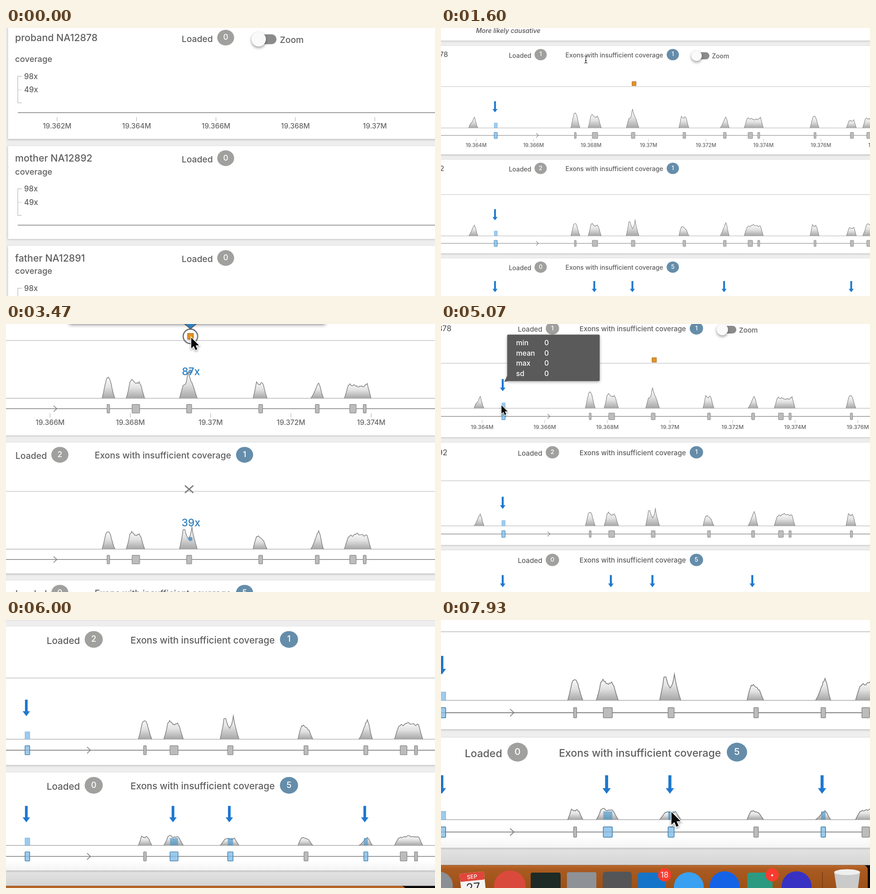
An HTML page with a canvas that plays this animation: 947x592 px, repeating every 8000 ms.

```html
<!DOCTYPE html>
<html lang="en">
<head>
<meta charset="utf-8">
<title>Gene coverage</title>
<style>
html, body { margin: 0; width: 100%; height: 100%; overflow: hidden; background: #eee; }
canvas { display: block; }
</style>
</head>
<body>
<canvas id="stage" width="947" height="592"></canvas>
<script>
const ctx = document.getElementById('stage').getContext('2d');
const LOOP = 8000, TRACK = 58.5, LEFT = -111, RIGHT = 1300;
const CLOSE = { s: 1.663, x: -197.5, y: -586 };
const FONT = 'Inter, "Open Sans", sans-serif';

const lerp = (a, b, p) => a + (b - a) * p;
const ramp = (t, a, b) => Math.min(1, Math.max(0, (t - a) / (b - a)));
const smooth = p => p * p * (3 - 2 * p);
const sine = p => (1 - Math.cos(Math.PI * p)) / 2;
const noise = n => { const v = Math.sin(n * 12.9898) * 43758.5453; return v - Math.floor(v) - 0.5; };

// Relative heights, evenly spaced across a peak
const shape = {
  skew: [0, .3, .45, .55, .8, 1, .6, .25, 0],
  bell: [0, .3, .66, .94, 1, .98, .82, .5, .22, 0],
  twin: [0, .35, .86, 1, .9, .8, .82, .87, .68, .32, 0],
  spire: [0, .25, .5, .53, .68, 1, .76, .6, .42, .2, 0],
  notch: [0, .38, .86, .87, .6, .46, .6, .98, .56, .26, 0],
  crown: [0, .45, 1, .85, .82, .95, .78, .35, 0],
  fall: [0, .55, .95, 1, .85, .78, .65, .3, 0],
  rise: [0, .15, .35, .6, .85, 1, .75, .3, 0],
  wide: [0, .4, .85, .97, .85, .92, .82, .76, .82, .85, .8, .92, 1, .5, 0],
  hump: [0, .4, .75, .85, .82, .9, .93, 1, .9, .92, .85, .87, .85, .4, 0],
  flat: [0, .4, .85, .95, .88, .85, 1, .5, 0]
};

// left, right, then [height, shape] for each sample
const peaks = [
  [62, 82, [24, 'skew'], [24, 'rise'], [13, 'flat']],
  [287, 307, [32, 'bell'], [27.5, 'bell'], [14, 'crown']],
  [325, 354, [30, 'twin'], [28, 'twin'], [15, 'twin']],
  [409, 437, [41, 'spire'], [35.5, 'notch'], [11, 'flat']],
  [525, 547, [26, 'crown'], [21, 'fall'], [12, 'fall']],
  [616, 636, [24, 'rise'], [29, 'rise'], [12, 'rise']],
  [669, 711, [23.5, 'wide'], [25, 'hump'], [14.5, 'hump']],
  [814, 834, [26, 'bell'], [25, 'crown'], [14, 'crown']],
  [894, 916, [18, 'flat'], [19, 'flat'], [12, 'flat']],
  [930, 970, [23, 'wide'], [27, 'twin'], [14, 'hump']]
];

// centre, width
const exons = [[121.5, 7], [296.8, 4], [340.2, 12], [424.2, 8], [537, 6], [626.2, 6],
  [682.5, 10], [701, 4.6], [825, 4.6], [906.3, 7], [943, 8]];

const rows = [
  { name: 'proband NA12878', loaded: 1, low: [0], lowCount: 1, top: 40, gene: 179, end: 221, before: 0, own: 1 },
  { name: 'mother NA12892', loaded: 2, low: [0], lowCount: 1, top: 232.3, gene: 358.5, end: 380.5, before: 1, own: 1 },
  { name: 'father NA12891', loaded: 0, low: [0, 2, 3, 5, 9], lowCount: 5, top: 391.5, gene: 517, end: 538, before: 2, own: 0 }
];

function text(str, x, y, size, color = '#5e5e5e', align = 'left', style = '500') {
  ctx.font = `${style} ${size}px ${FONT}`;
  ctx.textAlign = align;
  ctx.textBaseline = 'alphabetic';
  ctx.fillStyle = color;
  ctx.fillText(str, x, y + size * 0.355);
}

function line(color, width, ...p) {
  ctx.strokeStyle = color;
  ctx.lineWidth = width;
  ctx.beginPath();
  for (let i = 0; i < p.length; i += 2) ctx.lineTo(p[i], p[i + 1]);
  ctx.stroke();
}

function poly(color, ...p) {
  ctx.fillStyle = color;
  ctx.beginPath();
  for (let i = 0; i < p.length; i += 2) ctx.lineTo(p[i], p[i + 1]);
  ctx.closePath();
  ctx.fill();
}

function rect(color, x, y, w, h, r = 0) {
  ctx.fillStyle = color;
  ctx.beginPath();
  ctx.roundRect(x, y, w, h, r);
  ctx.fill();
}

function disc(color, x, y, rx, ry = rx) {
  ctx.fillStyle = color;
  ctx.beginPath();
  ctx.ellipse(x, y, rx, ry, 0, 0, 7);
  ctx.fill();
}

function shadow(color, blur, dy) {
  ctx.shadowColor = color;
  ctx.shadowBlur = blur;
  ctx.shadowOffsetY = dy;
}

function faded(alpha, draw) {
  if (alpha <= 0) return;
  ctx.save();
  ctx.globalAlpha = alpha;
  draw();
  ctx.restore();
}

function card(top, bottom) {
  ctx.save();
  shadow('rgba(0,0,0,.22)', 4, 1.5);
  rect('#fff', -126.5, top, RIGHT + 200, bottom - top);
  ctx.restore();
}

function badge(x, y, n, color) {
  disc(color, x, y, 13.5, 12.5);
  text(n, x, y - 0.8, 12.4, '#fff', 'center');
}

function toggle(x, y) {
  rect('#8b8b8b', x - 8, y - 7.8, 36.3, 15.6, 7.8);
  ctx.save();
  shadow('rgba(0,0,0,.4)', 6, 3);
  disc('#fafafa', x, y, 11.5);
  ctx.restore();
  text('Zoom', x + 33.7, y + 0.8, 13.9);
}

function peak(x0, x1, height, pts, base, seed) {
  const n = (pts.length - 1) * 2;
  const g = ctx.createLinearGradient(0, base - height, 0, base);
  g.addColorStop(0, '#fafafa');
  g.addColorStop(0.45, '#e2e2e2');
  g.addColorStop(1, '#a6a6a6');
  ctx.beginPath();
  for (let i = 0; i <= n; i++) {
    const a = pts[i >> 1], b = pts[(i + 1) >> 1];
    let h = (a + b) / 2;
    if (i % 2 && h > 0.6) h += noise(seed + i) * 0.12;
    ctx.lineTo(lerp(x0, x1, i / n), base - h * height);
  }
  ctx.fillStyle = g;
  ctx.fill();
  ctx.strokeStyle = '#848484';
  ctx.lineWidth = 1.05;
  ctx.stroke();
}

function downArrow(x, y) {
  rect('#1d78cf', x - 2, y, 4, 19);
  poly('#1d78cf', x - 5.5, y + 17.2, x + 5.5, y + 17.2, x, y + 24.6);
}

function coverage(row, index, base) {
  line('#a9a9a9', 0.9, LEFT, base, RIGHT, base);
  peaks.forEach((p, i) => {
    const [h, kind] = p[2 + index];
    peak(p[0], p[1], h, shape[kind], base, index * 40 + i * 7);
  });
  for (const i of row.low) {
    const [x, w] = exons[i];
    rect(i ? 'rgba(66,145,200,.62)' : '#9ccbee', x - w / 2, base - 11, w, 11);
    if (!i) { ctx.strokeStyle = '#7fb4df'; ctx.lineWidth = 0.7; ctx.strokeRect(x - w / 2, base - 11, w, 11); }
    downArrow(x - 1.6, base - 59);
  }
}

function genes(row, y) {
  exons.forEach(([x, w], i) => {
    const low = row.low.includes(i);
    rect(low ? '#9ccaec' : '#bcbcbc', x - w / 2, y - 6.8, w, 13.6, 0.8);
    ctx.strokeStyle = low ? '#3c7aa8' : '#888';
    ctx.lineWidth = 0.9;
    ctx.stroke();
    if (low) line('rgba(60,122,168,.45)', 0.8, x - w / 2, y, x + w / 2, y);
  });
  line('#777', 1, 210.5, y - 4.8, 215.5, y, 210.5, y + 4.8);
}

function drawRow(row, index, open) {
  const shift = TRACK * open;
  const top = row.top + row.before * shift;
  const low = shift * (row.before + row.own);
  const y = row.gene + low, base = y - 16.4, head = top + 20;
  card(top, row.end + low);

  text(row.name, -115.3, head - 0.5, 15.4);
  text('Loaded', 150.3, head + 1.2, 13.9);
  badge(220.4, head - 0.6, open > 0.3 ? row.loaded : 0, '#a0a09e');
  if (!index) toggle(open > 0 ? 564 : 273, head + 2);

  text('coverage', -115.3, base - 69.2, 13.3);
  line('#b8b8b8', 0.9, LEFT + 6.5, base - 41.5, LEFT, base - 41.5, LEFT, base + 0.8, LEFT + 6.5, base + 0.8);
  line('#d4d4d4', 0.9, LEFT, base - 20, LEFT + 6.5, base - 20);
  text('98x', -100.8, base - 41.5, 12);
  text('49x', -100.8, base - 20, 12);

  line('#7d7d7d', 1.1, LEFT, y, RIGHT, y);
  if (!index) {
    for (let i = 0; i < 10; i++) {
      const x = -48.3 + i * 126.6;
      line('#b8b8b8', 0.9, x, y + 7.3, x, y + 13.8);
      text((19362 + 2 * i) / 1000 + 'M', x, y + 21.5, 11.2, '#666', 'center');
    }
  }

  faded(open, () => {
    text('Exons with insufficient coverage', 275.2, head + 0.3, 13.9);
    badge(511.6, head - 0.6, row.lowCount, '#658daa');
    if (row.own) line('#c2c2c2', 1, LEFT, base - 91.2, RIGHT, base - 91.2);
    coverage(row, index, base);
    genes(row, y);
    if (!index) {
      rect('#e8921f', 421.8, 118.8, 9, 9);
      ctx.strokeStyle = '#96682c';
      ctx.lineWidth = 0.9;
      ctx.stroke();
    }
  });
}

function depth(label, y, dotY) {
  text(label, 427, y, 16.3, '#2c7dbd', 'center');
  disc('rgba(58,132,192,.75)', 426.2, dotY, 3.3);
}

function variantHover(t) {
  faded(ramp(t, 2280, 2750), () => {
    ctx.strokeStyle = '#777';
    ctx.lineWidth = 2;
    ctx.beginPath();
    ctx.arc(426.2, 123.3, 11.4, 0, 7);
    ctx.stroke();
    line('#808080', 2, 417.5, 358.8, 430.8, 370.4);
    line('#808080', 2, 417.5, 370.4, 430.8, 358.8);
    depth('87x', 179, 178.9);
    depth('39x', 417, 443);
  });
  faded(smooth(ramp(t, 2870, 3470)), () => {
    ctx.save();
    shadow('rgba(0,0,0,.55)', 9, 3);
    rect('#fff', 235, 20, 404, 82.5, 2);
    ctx.restore();
    poly('#555', 415, 103, 437.5, 103, 426.3, 112.2);
    poly('#2f83c6', 416.5, 102, 436, 102, 426.3, 110.8);
  });
}

function depthTip() {
  ctx.save();
  shadow('rgba(0,0,0,.35)', 6, 2);
  rect('#5a5a5a', 129, 72, 187, 94, 2);
  ctx.restore();
  poly('#5a5a5a', 123, 167.5, 129, 155, 138, 165);
  ['min', 'mean', 'max', 'sd'].forEach((name, i) => {
    const y = 88.8 + i * 20.6;
    text(name, 147, y, 14.4, '#fff');
    text('0', 204, y, 14.4, '#fff');
  });
}

// Laid out in stage pixels at the closest zoom
function dock() {
  ctx.save();
  ctx.scale(1 / CLOSE.s, 1 / CLOSE.s);
  ctx.translate(-CLOSE.x, -CLOSE.y);
  const fade = ctx.createLinearGradient(0, 478, 0, 542);
  fade.addColorStop(0, 'rgba(0,0,0,0)');
  fade.addColorStop(1, 'rgba(0,0,0,.11)');
  rect(fade, -400, 478, 2400, 64);
  rect('#0c0808', -400, 541.5, 2400, 200);
  const wood = ctx.createLinearGradient(0, 542, 0, 592);
  wood.addColorStop(0, '#bb672a');
  wood.addColorStop(0.2, '#a95a20');
  wood.addColorStop(1, '#9c5118');
  rect(wood, -400, 541.5, 1342, 200, [0, 10, 0, 0]);

  disc('#8b9096', -4, 586, 30);
  ctx.save();
  ctx.translate(70, 590);
  ctx.rotate(-0.1);
  rect('#f4f4f4', -26, -32, 54, 60, 3);
  rect('#e0453c', -26, -32, 54, 18, 3);
  text('SEP', 1, -23, 12, '#fff', 'center');
  text('27', 1, 1, 27, '#333', 'center', '400');
  ctx.restore();
  disc('#d94a3c', 152, 588, 35);
  rect('#1d2a26', 198, 558, 66, 60, 4);
  rect('#8e9296', 278, 557, 65, 60, 4);
  rect('#555557', 357, 556, 64, 60, 6);
  rect('#1474c9', 435, 558, 60, 60, 4);
  disc('#3aa0f2', 547, 590, 33);
  disc('#1463e6', 626, 588, 33);
  rect('#2b9a80', 676, 558, 56, 60, 6);
  disc('#3732c4', 785, 588, 33);
  disc('#fb3b2f', 493.5, 563, 14.5);
  text('18', 493.5, 563, 17, '#fff', 'center', '400');
  disc('#fb3b2f', 731, 563, 14.5);
  disc('#fff', 731, 564, 2.3);
  line('#7d431a', 2, 842, 556, 842, 600);
  poly('#c9cac9', 868, 557, 925, 557, 917, 620, 877, 620);
  disc('#efefee', 896.5, 557, 28.5, 6.5);
  ctx.restore();
}

function arrowCursor(x, y) {
  ctx.save();
  ctx.translate(x, y);
  ctx.scale(1.04, 1.04);
  ctx.beginPath();
  for (const [px, py] of [[0, 0], [0, 16.4], [3.8, 12.9], [6.4, 18.9], [9.2, 17.7], [6.7, 11.9], [11.8, 11.8]]) ctx.lineTo(px, py);
  ctx.closePath();
  shadow('rgba(0,0,0,.4)', 4, 2);
  ctx.strokeStyle = '#fff';
  ctx.lineWidth = 2;
  ctx.stroke();
  shadow('transparent', 0, 0);
  ctx.fillStyle = '#0a0a0a';
  ctx.fill();
  ctx.restore();
}

function beamCursor(x, y) {
  for (const [color, w] of [['#fff', 2.6], ['#222', 1.2]]) {
    line(color, w, x, y - 7, x, y + 7);
    line(color, w, x - 3.2, y - 8.2, x, y - 7, x + 3.2, y - 8.2);
    line(color, w, x - 3.2, y + 8.2, x, y + 7, x + 3.2, y + 8.2);
    line(color, w, x - 2, y + 2.5, x + 2, y + 2.5);
  }
}

function cursor(t) {
  if (t < 1200) return;
  if (t < 5070) {
    const p = sine(ramp(t, 1630, 2080));
    const x = lerp(320, 423.8, p) + 3.7 * ramp(t, 2130, 2500), y = lerp(70, 125.3, p);
    return p < 0.3 ? beamCursor(x, y) : arrowCursor(x, y);
  }
  const a = sine(ramp(t, 6050, 6500)), b = sine(ramp(t, 6800, 7600)), c = ramp(t, 7690, 7930);
  arrowCursor(lerp(lerp(117.4, 557, a), 427, b) - 2.4 * c, lerp(lerp(215, 449, a), 609.4, b) - 2 * c);
}

function camera(t) {
  if (t < 1200) return [1.385, 179.7, -61];
  if (t < 5070) {
    const s = lerp(0.9, 1.4, sine(ramp(t, 1200, 2545)));
    return [s, 474 * (1 - s), 363.5 * (1 - s)];
  }
  const p = ramp(t, 5070, 6530);
  const s = lerp(1.0915, CLOSE.s, lerp(smooth(p), p, 0.33));
  return [s, CLOSE.x + 355 * (CLOSE.s - s), CLOSE.y + 929 * (CLOSE.s - s)];
}

function draw(t) {
  const [s, x, y] = camera(t);
  const open = smooth(ramp(t, 70, 400));
  ctx.setTransform(1, 0, 0, 1, 0, 0);
  ctx.fillStyle = '#eee';
  ctx.fillRect(0, 0, 947, 592);
  ctx.setTransform(s, 0, 0, s, x, y);
  card(-200, 28.5);
  text('More likely causative', 78, 7, 14, '#555', 'left', 'italic 500');
  rows.forEach((row, i) => drawRow(row, i, open));
  if (t < 5070) variantHover(t);
  else {
    depthTip();
    dock();
  }
  cursor(t);
}

const start = performance.now();
function tick() {
  draw((performance.now() - start) % LOOP);
  requestAnimationFrame(tick);
}
tick();
</script>
</body>
</html>
```
